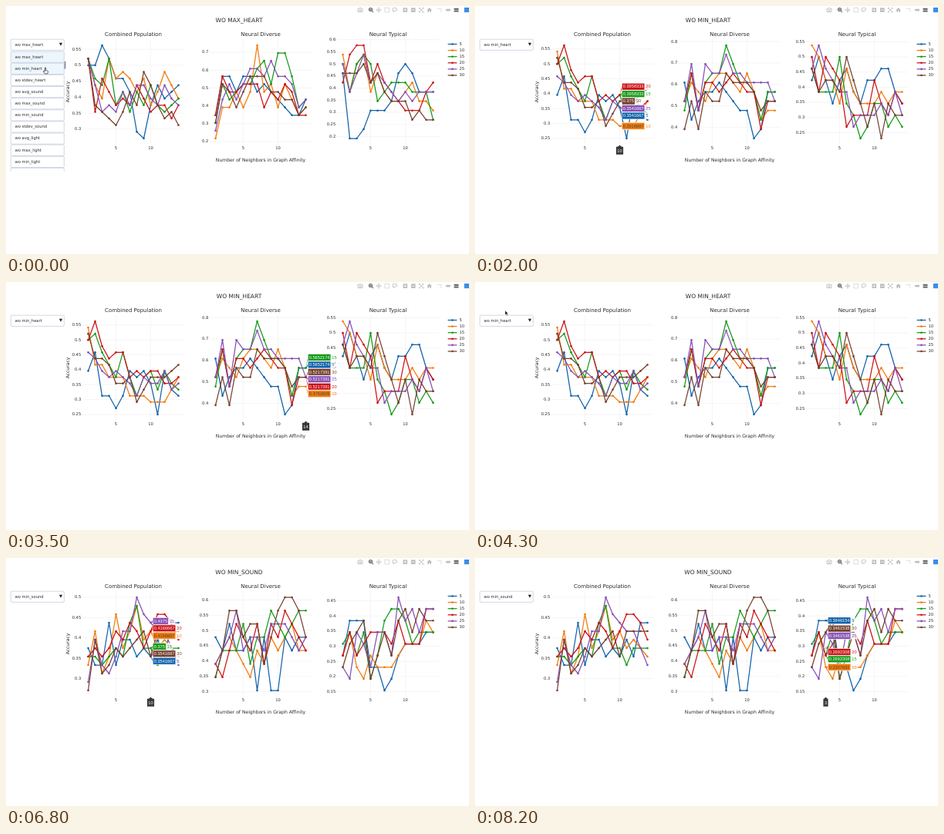
Write an HTML page with a canvas that moves like this. It is 600 px wide and 322 px high and loops after 8300 ms.

```html
<!DOCTYPE html>
<html lang="en">
<head>
<meta charset="utf-8">
<title>Accuracy by number of neighbors</title>
<style>
html, body { margin: 0; width: 100%; height: 100%; overflow: hidden; background: #fff; }
canvas { display: block; width: 600px; height: 322px; }
</style>
</head>
<body>
<canvas id="stage"></canvas>
<script>
const LOOP = 8300, STEP = 100;
const SANS = '"DejaVu Sans", sans-serif', LABEL = '"Liberation Sans", sans-serif';
const INK = '#2a2a2a';
const COLORS = ['#1262ab', '#f27a0a', '#159a18', '#cc1216', '#8751b5', '#75402f'];
const NEIGHBORS = [5, 10, 15, 20, 25, 30];
const COLUMNS = [
  { title: 'Combined Population', x: 106.5, size: 48 },
  { title: 'Neural Diverse', x: 271.5, size: 23 },
  { title: 'Neural Typical', x: 436.5, size: 26 }
];
const MENU = ['max_heart', 'min_heart', 'stdev_heart', 'avg_sound', 'max_sound', 'min_sound',
  'stdev_sound', 'avg_light', 'max_light', 'min_light', 'stdev_light'].map(s => 'wo ' + s);
const TOP = 51, BOTTOM = 172, DX = 9;

// Each row holds correct answers per neighbor count; accuracy is row / column size.
const views = [[], [], []];
function plot(view, col, ...rows) {
  const all = rows.flat();
  views[view][col] = { ...COLUMNS[col], rows, hi: Math.max(...all), lo: Math.min(...all) };
}
plot(0, 0,
  [24, 24, 27, 25, 22, 22, 20, 14, 13, 18, 21, 19, 20, 21],
  [25, 21, 19, 25, 22, 23, 22, 20, 22, 18, 20, 23, 21, 19],
  [25, 22, 21, 25, 18, 20, 17, 20, 18, 21, 18, 17, 18, 19],
  [25, 17, 22, 20, 18, 19, 18, 21, 19, 17, 18, 18, 16, 18],
  [25, 21, 17, 18, 17, 20, 18, 21, 21, 19, 18, 21, 19, 18],
  [25, 18, 17, 16, 15, 17, 20, 18, 23, 21, 18, 16, 17, 15]);
plot(0, 1,
  [8, 13, 13, 11, 13, 13, 11, 12, 11, 10, 9, 8, 8, 10],
  [5, 9, 9, 11, 9, 11, 17, 11, 12, 9, 12, 10, 8, 9],
  [7, 12, 10, 11, 12, 12, 14, 15, 12, 16, 16, 13, 9, 10],
  [8, 13, 11, 11, 12, 12, 12, 9, 11, 10, 12, 11, 8, 8],
  [6, 10, 12, 10, 12, 14, 14, 13, 15, 13, 13, 12, 9, 10],
  [7, 12, 11, 9, 11, 13, 13, 13, 11, 11, 10, 10, 8, 9]);
plot(0, 2,
  [12, 5, 5, 6, 8, 8, 8, 9, 12, 13, 12, 10, 10, 10],
  [14, 10, 13, 14, 10, 12, 10, 9, 9, 10, 11, 9, 9, 8],
  [13, 10, 13, 14, 13, 9, 10, 11, 11, 11, 10, 10, 10, 7],
  [11, 14, 15, 15, 11, 13, 11, 10, 9, 8, 8, 8, 10, 11],
  [13, 10, 12, 14, 11, 12, 11, 10, 9, 10, 9, 10, 10, 10],
  [12, 12, 12, 13, 11, 12, 10, 9, 9, 9, 7, 8, 7, 7]);
plot(1, 0,
  [19, 22, 15, 15, 13, 15, 19, 18, 19, 17, 12, 19, 16, 15],
  [26, 20, 20, 18, 18, 18, 15, 15, 15, 14, 14, 14, 16, 18],
  [24, 25, 22, 20, 18, 22, 18, 15, 18, 19, 16, 19, 17, 16],
  [24, 27, 23, 21, 22, 22, 18, 19, 18, 19, 19, 17, 17, 18],
  [22, 21, 19, 18, 19, 18, 17, 15, 18, 17, 17, 19, 16, 17],
  [25, 21, 21, 20, 17, 17, 18, 14, 16, 18, 18, 18, 19, 20]);
plot(1, 1,
  [14, 10, 12, 13, 13, 14, 13, 12, 11, 11, 8, 9, 13, 13],
  [12, 14, 13, 12, 14, 15, 15, 14, 13, 15, 13, 10, 11, 11],
  [11, 15, 11, 14, 15, 15, 18, 16, 14, 14, 13, 10, 13, 13],
  [12, 15, 11, 14, 14, 13, 14, 15, 14, 13, 13, 9, 12, 12],
  [12, 16, 11, 16, 15, 15, 17, 15, 15, 14, 14, 14, 14, 12],
  [9, 12, 9, 13, 12, 12, 15, 14, 14, 14, 13, 11, 12, 12]);
plot(1, 2,
  [11, 13, 11, 9, 11, 12, 10, 9, 11, 11, 12, 12, 10, 9],
  [14, 13, 11, 11, 9, 12, 10, 9, 9, 9, 10, 9, 10, 10],
  [12, 10, 10, 10, 13, 9, 8, 6, 7, 9, 9, 7, 8, 7],
  [13, 10, 13, 12, 11, 7, 8, 8, 8, 11, 9, 8, 10, 9],
  [12, 14, 12, 11, 10, 10, 7, 8, 8, 8, 9, 8, 10, 8],
  [12, 10, 11, 11, 10, 13, 11, 9, 7, 9, 6, 9, 8, 8]);
plot(2, 0,
  [18, 16, 16, 21, 16, 19, 19, 17, 18, 17, 19, 17, 21, 21],
  [16, 20, 15, 17, 22, 18, 20, 23, 19, 20, 18, 19, 18, 17],
  [17, 17, 16, 17, 18, 17, 21, 23, 18, 18, 16, 18, 18, 18],
  [17, 18, 17, 18, 20, 19, 21, 20, 18, 20, 22, 22, 21, 19],
  [14, 19, 16, 15, 17, 20, 20, 24, 22, 21, 20, 20, 18, 16],
  [13, 19, 15, 16, 18, 17, 18, 19, 20, 17, 20, 20, 20, 20]);
plot(2, 1,
  [11, 10, 12, 10, 10, 11, 7, 11, 7, 7, 11, 10, 11, 11],
  [9, 10, 11, 10, 9, 8, 10, 9, 11, 10, 11, 12, 10, 10],
  [8, 10, 10, 10, 12, 9, 11, 11, 13, 12, 11, 12, 13, 13],
  [9, 8, 10, 12, 11, 10, 12, 9, 12, 11, 13, 12, 11, 10],
  [9, 10, 11, 13, 10, 11, 11, 10, 12, 12, 12, 11, 10, 11],
  [8, 10, 13, 13, 11, 12, 12, 9, 11, 13, 14, 14, 13, 11]);
plot(2, 2,
  [7, 10, 10, 10, 6, 6, 4, 5, 7, 8, 8, 8, 9, 9],
  [7, 9, 6, 5, 7, 6, 6, 6, 7, 8, 8, 8, 10, 9],
  [8, 9, 7, 9, 5, 7, 10, 11, 11, 10, 8, 9, 9, 9],
  [7, 9, 7, 8, 9, 9, 9, 8, 10, 8, 8, 8, 11, 11],
  [6, 5, 9, 8, 6, 9, 9, 7, 12, 10, 11, 9, 11, 11],
  [6, 8, 9, 10, 5, 7, 9, 7, 10, 11, 9, 11, 10, 10]);

// Pointer route: time, x, y
const ROUTE = [
  [0, 51, 83], [900, 51, 83], [1300, 105, 84], [1900, 185, 104], [2400, 225, 112], [2800, 265.5, 114],
  [3300, 350, 112], [3700, 500, 110], [4000, 250, 70], [4100, 80, 38], [4300, 39, 37], [4500, 40, 48],
  [4900, 48, 70], [5400, 50, 142], [5600, 50, 142], [6000, 125, 108], [6100, 133.5, 105.5],
  [6800, 196, 107], [7200, 330, 110], [7700, 491, 112], [8000, 457, 117], [8300, 456, 117]
];

const canvas = document.getElementById('stage'), g = canvas.getContext('2d');
const ratio = window.devicePixelRatio || 1;
canvas.width = 600 * ratio;
canvas.height = 322 * ratio;

function text(str, x, y, size, align = 'left', color = INK, family = SANS) {
  g.font = `${size}px ${family}`;
  g.textAlign = align;
  g.textBaseline = 'middle';
  g.fillStyle = color;
  g.fillText(str, x, y);
}
function line(points, color, width) {
  g.beginPath();
  points.forEach(([x, y]) => g.lineTo(x, y));
  g.strokeStyle = color;
  g.lineWidth = width;
  g.stroke();
}
function dot(x, y, r, color) {
  g.beginPath();
  g.arc(x, y, r, 0, 7);
  g.fillStyle = color;
  g.fill();
}
function box(x, y, w, h, fill, stroke) {
  g.beginPath();
  g.roundRect(x, y, w, h, stroke ? 0.9 : 0);
  g.fillStyle = fill;
  g.fill();
  if (!stroke) return;
  g.strokeStyle = stroke;
  g.lineWidth = 0.7;
  g.stroke();
}
function shape(d, x, y, fill, stroke, width = 0.8) {
  const path = new Path2D(d);
  g.save();
  g.translate(x, y);
  if (fill) { g.fillStyle = fill; g.fill(path); }
  if (stroke) { g.strokeStyle = stroke; g.lineWidth = width; g.stroke(path); }
  g.restore();
}

const xAt = (p, n) => p.x + (n - 1) * DX;
const yAt = (p, count) => TOP + (BOTTOM - TOP) * (p.hi - count) / (p.hi - p.lo);

function drawPlot(p) {
  const left = p.x - 8, right = p.x + 13 * DX + 8, mid = p.x + 6.5 * DX;
  text(p.title, mid, 37.6, 6.95, 'center');
  const step = (p.hi - p.lo) / p.size < 0.394 ? 0.05 : 0.1;
  for (let i = 1; i * step < 1; i++) {
    const y = yAt(p, i * step * p.size);
    if (y < 43 || y > 180) continue;
    line([[left, y], [right, y]], '#eeeeee', 0.6);
    text(+(i * step).toFixed(2), p.x - 9.3, y, 5.2, 'right');
  }
  for (const n of [5, 10]) {
    line([[xAt(p, n), 43], [xAt(p, n), 180]], '#eeeeee', 0.6);
    text(n, xAt(p, n), 184.3, 5.2, 'center');
  }
  p.rows.forEach((row, s) => {
    const points = row.map((count, i) => [xAt(p, i + 1), yAt(p, count)]);
    line(points, COLORS[s], 1.25);
    points.forEach(([x, y]) => dot(x, y, 1.3, COLORS[s]));
  });
}

// Sorted labels that would overlap are pooled and spread around their mean.
function spread(labels, gap) {
  const groups = [];
  for (const label of labels) {
    let cur = { items: [label], mid: label.y };
    while (groups.length) {
      const prev = groups[groups.length - 1];
      if (cur.mid - prev.mid >= gap * (cur.items.length + prev.items.length) / 2) break;
      const items = prev.items.concat(cur.items);
      cur = { items, mid: items.reduce((sum, l) => sum + l.y, 0) / items.length };
      groups.pop();
    }
    groups.push(cur);
  }
  for (const { items, mid } of groups)
    items.forEach((l, i) => l.at = mid + (i - (items.length - 1) / 2) * gap);
}

function drawHover(plots, [mx, my]) {
  const p = plots.find(q => mx > q.x - 8 && mx < q.x + 13 * DX + 8);
  if (!p || my < 43 || my > 180) return;
  const n = Math.max(1, Math.min(14, Math.round((mx - p.x) / DX) + 1)), x = xAt(p, n);
  const labels = p.rows.map((row, s) => ({ s, count: row[n - 1], y: yAt(p, row[n - 1]) }))
    .sort((a, b) => b.count - a.count || b.s - a.s);
  spread(labels, 9.45);
  for (const { s, count, y, at } of labels) {
    const value = String(+(count / p.size).toFixed(7));
    g.font = `5.64px ${LABEL}`;
    const w = g.measureText(value).width + 3, nameW = g.measureText(NEIGHBORS[s]).width + 2.6;
    box(x + 2.8 + w, at - 4.4, nameW, 8.8, 'rgba(255,255,255,.85)');
    g.beginPath();
    [[x, y], [x + 3, at - 2], [x + 3, at + 2]].forEach(([a, b]) => g.lineTo(a, b));
    g.fillStyle = COLORS[s];
    g.fill();
    box(x + 2.8, at - 4.5, w, 9, COLORS[s], '#ffffff');
    text(value, x + 4.3, at + 0.2, 5.64, 'left', s === 1 ? '#444444' : '#ffffff', LABEL);
    text(NEIGHBORS[s], x + 4.2 + w, at + 0.2, 5.64, 'left', COLORS[s], LABEL);
  }
  const half = n > 9 ? 4.6 : 3.1;
  shape('M0 180.4l2.4 2.6h-4.8z', x, 0, '#383838');
  box(x - half, 182.8, half * 2, 10, '#383838');
  text(n, x, 188, 5.64, 'center', '#ffffff', LABEL);
}

function drawToolbar() {
  const pale = '#bdbdbd', dark = '#6f6f6f';
  const icon = (x, d, color = pale, width = 0.9) => shape(d, x, 5.2, null, color, width);
  icon(459, 'M-3-1.8h1.6l.6-1h1.6l.6 1H3V2.5h-6zM1.2.3a1.2 1.2 0 1 1-2.4 0a1.2 1.2 0 1 1 2.4 0');
  icon(473, 'M1.6-.6a2.1 2.1 0 1 1-4.2 0a2.1 2.1 0 1 1 4.2 0M1 1l2 2M-1.6-.6h2.2M-.5-1.7v2.2', dark, 1.1);
  icon(483, 'M-3 0h6M0-3v6M-3 0l1-1M-3 0l1 1M3 0l-1-1M3 0l-1 1M0-3l-1 1M0-3l1 1M0 3l-1-1M0 3l1-1');
  g.setLineDash([1.2, 1]);
  icon(493.7, 'M-2.8-2.8h5.6v5.6h-5.6z');
  g.setLineDash([]);
  icon(503.7, 'M3-.8a3 2 0 1 1-6 0a3 2 0 1 1 6 0M-2 1l.8 2');
  for (const x of [517.3, 527.8]) shape('M-2.8-2.8h5.6v5.6h-5.6z', x, 5.2, pale);
  icon(517.3, 'M-1.7 0h3.4M0-1.7v3.4', '#ffffff', 0.8);
  icon(527.8, 'M-1.7 0h3.4', '#ffffff', 0.8);
  icon(538.2, 'M-1.3-2.8h-1.5v1.5M1.3-2.8h1.5v1.5M-1.3 2.8h-1.5v-1.5M1.3 2.8h1.5v-1.5M-2-2l4 4M2-2l-4 4');
  shape('M0-3l3.3 3h-1v2.8H.7V1H-.7v1.8h-1.6V0h-1z', 548.7, 5.2, pale);
  g.setLineDash([0.9, 0.9]);
  icon(562, 'M-2.8-1.8h4.6v4.6');
  g.setLineDash([]);
  shape('M-3.2 0l1.6-1.4h4.8v2.8h-4.8z', 572.7, 5.2, pale);
  shape('M-3.2-1.4l1-1.1h5.4v2.2h-5.4zM-3.2 1.5l1-1.1h5.4v2.2h-5.4z', 583.3, 5.2, dark);
  box(593.8, 2, 6.2, 6.2, '#3a8ee6');
}

function drawLegend() {
  NEIGHBORS.forEach((n, s) => {
    const y = 49.5 + s * 8.1;
    line([[572.6, y], [584.4, y]], COLORS[s], 1.25);
    dot(578.5, y, 1.3, COLORS[s]);
    text(n, 587.5, y, 5.2);
  });
}

function drawMenu(view, open, [mx, my]) {
  const current = [0, 1, 5][view];
  const button = (label, y, lit) => {
    box(6.3, y - 7.1, 69, 14.2, lit ? '#eef6fd' : '#ffffff', '#bec8d9');
    text(label, 11.4, y, 5.2);
  };
  const over = y => mx > 6 && mx < 75.5 && Math.abs(my - y) < 7.3;
  button(MENU[current], 50.3, over(50.3));
  shape('M-2.2-1.9h4.4l-2.2 4z', 71, 49.6, INK);
  if (!open) return;
  const active = view ? 1 : 0;
  g.save();
  g.beginPath();
  g.rect(0, 57, 80, 157.6);
  g.clip();
  MENU.forEach((label, i) => {
    const y = 66.2 + i * 15.13;
    button(label, y, i === active || over(y));
  });
  g.restore();
  box(75.6, 72, 1.8, 9.5, '#808ba4');
}

function drawCursor([x, y], open, t) {
  const overMenu = x < 76 && y > 43 && y < (open || t < 1000 || t > 5400 ? 215 : 58);
  if (overMenu)
    shape('M-.6-3.4q.7-.7 1.2 0V0l2.4.7q.7.3.5 1.2L2.8 4.4H-.6L-2.6 1.5q0-1 1-.6l1 .8z', x, y + 0.5, '#ffffff', '#222222', 0.7);
  else if (x > 98 && y > 43 && y < 180) {
    line([[x - 3, y], [x + 3, y]], '#555555', 0.7);
    line([[x, y - 3], [x, y + 3]], '#555555', 0.7);
  } else
    shape('M0 0v5.8l1.4-1.2 1 2.1 1-.5-1-2h1.8z', x, y, '#111111', '#ffffff', 0.4);
}

function pointerAt(t) {
  const i = Math.max(1, ROUTE.findIndex(k => k[0] >= t));
  const [t0, x0, y0] = ROUTE[i - 1], [t1, x1, y1] = ROUTE[i];
  const f = (t - t0) / (t1 - t0);
  return [x0 + (x1 - x0) * f, y0 + (y1 - y0) * f];
}

function draw(t) {
  const view = t < 600 ? 0 : t < 5500 ? 1 : 2;
  const open = t < 600 || (t >= 4700 && t < 5500);
  const pointer = pointerAt(t);
  g.setTransform(ratio, 0, 0, ratio, 0, 0);
  g.lineJoin = 'round';
  g.fillStyle = '#ffffff';
  g.fillRect(0, 0, 600, 322);
  drawToolbar();
  const name = MENU[[0, 1, 5][view]];
  text(name.toUpperCase(), 302, 18.6, 7.5, 'center');
  views[view].forEach(drawPlot);
  text('Number of Neighbors in Graph Affinity', 330, 200.6, 6.07, 'center');
  g.save();
  g.translate(80.6, 111.5);
  g.rotate(-Math.PI / 2);
  text('Accuracy', 0, 0, 6.07, 'center');
  g.restore();
  drawLegend();
  drawMenu(view, open, pointer);
  drawCursor(pointer, open, t);
  drawHover(views[view], pointerAt(Math.max(0, t - 100)));
}

function tick() {
  draw(Math.floor(performance.now() % LOOP / STEP) * STEP);
  requestAnimationFrame(tick);
}
tick();
</script>
</body>
</html>
```
